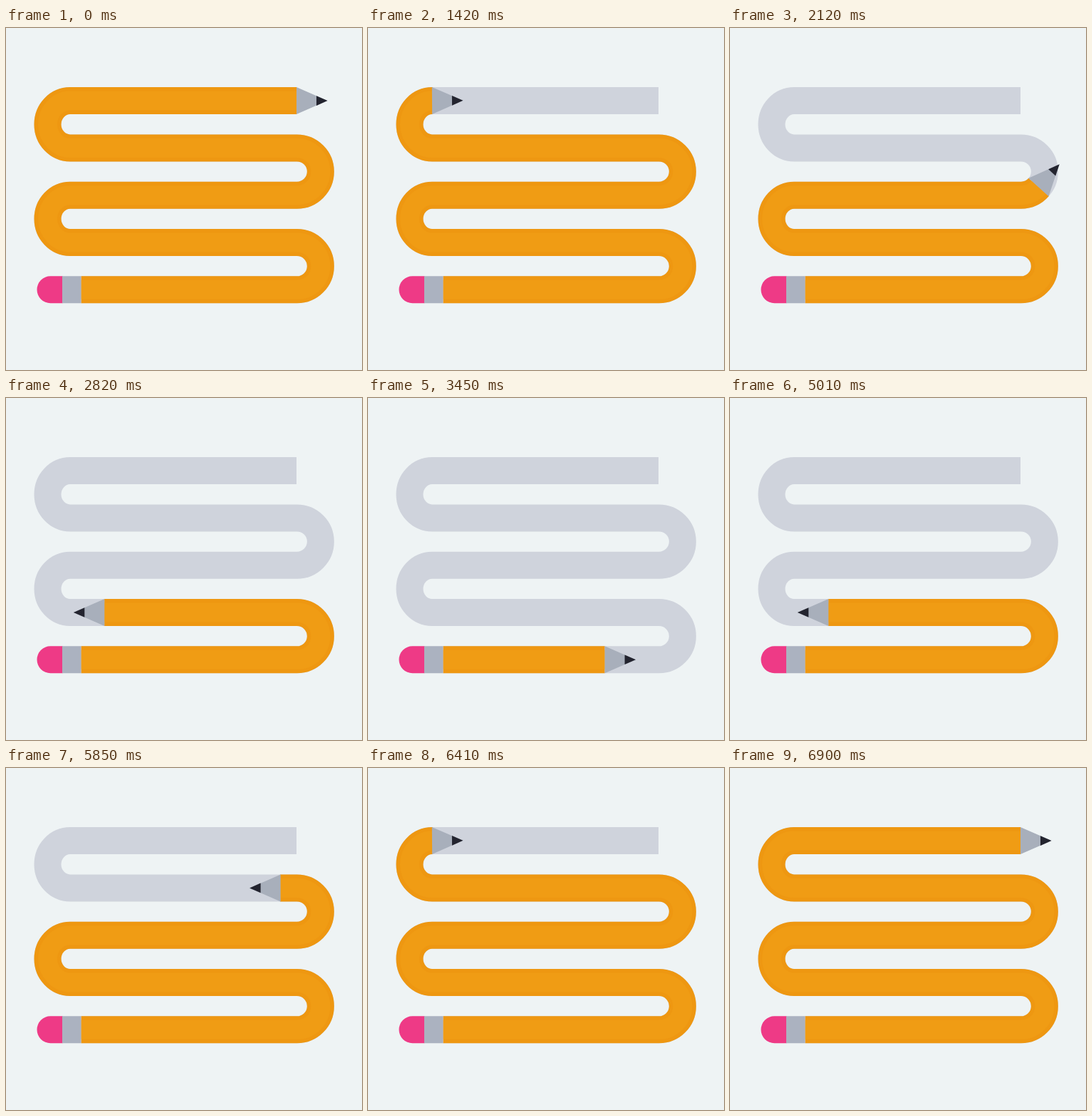
Animation, 500 px wide and 480 px high, one loop 7.9 s. Source, as an HTML page:

```html
<!DOCTYPE html>
<html lang="en">
<head>
<meta charset="utf-8">
<title>Winding pencil</title>
<style>
  html, body { margin: 0; height: 100%; overflow: hidden; background: #eef3f4; }
  svg { display: block; width: 500px; height: 480px; }
  use { fill: none; stroke-width: 38; }
</style>
</head>
<body>
<svg viewBox="0 0 500 480">
  <defs>
    <path id="track" d="M105.5 367.3H408.7a33.15 33.15 0 0 0 0-66.3H90a31.5 33.15 0 0 1 0-66.3H408.7a33.15 33.15 0 0 0 0-66.3H90a31.5 33.15 0 0 1 0-66.3H408"/>
  </defs>
  <use href="#track" stroke="#cfd3dc"/>
  <use class="body" href="#track" stroke="#ee9711"/>
  <use class="body" href="#track" stroke="#f09c14" style="stroke-width:27"/>
  <path d="M79.5 348.3H62.5a19 19 0 0 0 0 38H79.5z" fill="#ee3a86"/>
  <path d="M79 348.3H105.5v38H79z" fill="#abb2c0"/>
  <g id="tip">
    <path d="M0-19L43.5 0L0 19z" fill="#a8afbb"/>
    <path d="M28-6.8L43.5 0L28 6.8z" fill="#23242f"/>
  </g>
</svg>
<script>
const LOOP = 7900, STEP = 70, STEPS = 36;
const SPEED = 49.65, LAG = 0.595, TRAVEL = 1761.7;
const track = document.getElementById('track');
const tip = document.getElementById('tip');
const bodies = document.querySelectorAll('.body');
const total = track.getTotalLength();

// Steps retracted: out from 1000 ms, back from 4450 ms.
function stepAt(t) {
  const out = Math.floor((t - 1000) / STEP) + 1;
  const back = Math.floor((t - 4450) / STEP) + 1;
  return Math.max(0, Math.min(out, STEPS - back, STEPS));
}

function draw(now) {
  const step = stepAt(now % LOOP);
  const cut = step === STEPS ? TRAVEL : Math.max(0, SPEED * (step - LAG));
  const length = total - cut;
  const end = track.getPointAtLength(length);
  const before = track.getPointAtLength(length - 0.5);
  const angle = Math.atan2(end.y - before.y, end.x - before.x) * 180 / Math.PI;
  bodies.forEach(b => b.setAttribute('stroke-dasharray', `${length} 9999`));
  tip.setAttribute('transform', `translate(${end.x} ${end.y}) rotate(${angle})`);
  requestAnimationFrame(draw);
}
draw(performance.now());
</script>
</body>
</html>
```
